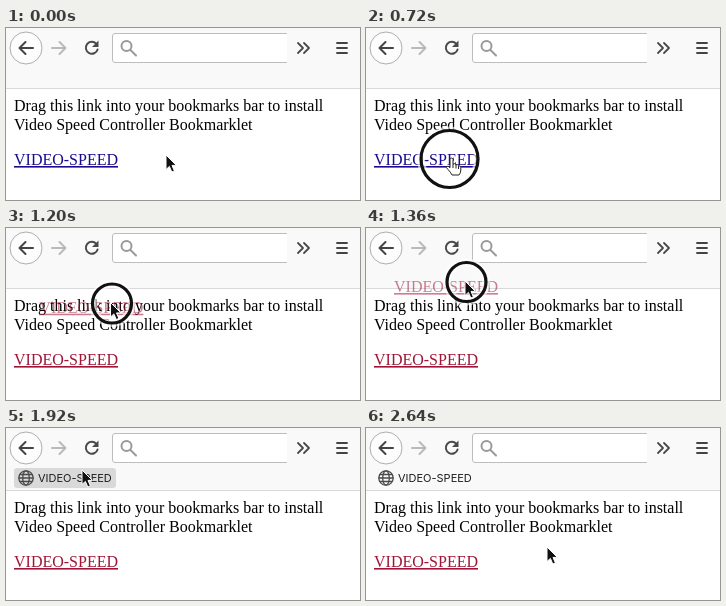
These frames come from a looping animation (354x172 px, 2720 ms). An HTML page:

```html
<!DOCTYPE html>
<html lang="en">
<head>
<meta charset="utf-8">
<title>Install the bookmarklet</title>
<style>
html, body { margin: 0; width: 100%; height: 100%; overflow: hidden; background: #fff; }
svg { display: block; width: 354px; height: 172px; }
text { white-space: pre; }
.page { font: 16px "Liberation Serif", "Times New Roman", serif; }
.bar { font: 11px Inter, Roboto, sans-serif; }
.line { fill: none; stroke-linecap: round; stroke-linejoin: round; }
.link { text-decoration: underline; }
</style>
</head>
<body>
<svg viewBox="0 0 354 172">
  <rect width="354" height="172" fill="#fff"/>
  <rect id="chrome" width="354" height="60" fill="#f9f9fa"/>
  <rect id="rule" y="60" width="354" height="1" fill="#d9d9db"/>

  <circle cx="20" cy="20" r="16" fill="#fdfdfd" stroke="#adadad"/>
  <path class="line" d="M27 20H13.5M19.5 14L13.5 20L19.5 26" stroke="#444" stroke-width="2"/>
  <path class="line" d="M46 20H59.5M53.5 14L59.5 20L53.5 26" stroke="#b9b9b9" stroke-width="2"/>
  <path class="line" d="M90.2 15.6A6 6 0 1 0 91.6 21.5" stroke="#4a4a4a" stroke-width="2"/>
  <path d="M92.5 12.5V19H86Z" fill="#4a4a4a"/>
  <path d="M281 5.5H109Q106.500 5.500 106.500 8V32Q106.500 34.500 109 34.500H281" fill="#fff" stroke="#bdbdbd"/>
  <g class="line" stroke="#999" stroke-width="2">
    <circle cx="120.500" cy="18" r="5"/>
    <path d="M124.500 22L130 27.500"/>
  </g>
  <path class="line" d="M292 15L297 20L292 25M298 15L303 20L298 25" stroke="#4a4a4a" stroke-width="1.8"/>
  <path class="line" d="M331 15H341M331 20H341M331 25H341" stroke="#444" stroke-width="1.8"/>

  <g id="mark">
    <rect id="hover" x="8" y="40" width="102" height="20" rx="3" fill="#d9d9da"/>
    <g class="line" stroke="#4a4a4a" stroke-width="1.300">
      <circle cx="20" cy="50" r="7.200"/>
      <ellipse cx="20" cy="50" rx="3.300" ry="7.200"/>
      <path d="M13 50H27M14 46.500H26M14 53.500H26"/>
    </g>
    <text class="bar" x="32" y="54" fill="#1c1c1c">VIDEO-SPEED</text>
  </g>

  <g id="page" class="page">
    <text x="8" y="83">Drag this link into your bookmarks bar to install</text>
    <text x="8" y="102">Video Speed Controller Bookmarklet</text>
    <text id="link" class="link" x="8" y="137">VIDEO-SPEED</text>
  </g>

  <path id="slot" class="line" d="M0 41Q2.500 47 0 53" stroke="#555" stroke-width="1.500"/>
  <text id="ghost" class="page link" fill="#a01535" opacity=".55">VIDEO-SPEED</text>

  <g id="ring" fill="none">
    <circle stroke="#fff" stroke-opacity=".6" stroke-width="8"/>
    <circle stroke="#111" stroke-width="3.200"/>
  </g>
  <g id="cursor">
    <path id="arrow" d="M0 0V14.500L3.400 11.400L5.800 17L8.400 15.900L6 10.400H10.400Z" fill="#111" stroke="#fff"/>
    <path id="hand" d="M2 1.500Q2 0 3.500 0T5 1.500V6Q7 5 8 6.700Q10 6 10.700 7.700Q12.800 7.500 12.800 9.500V12Q12.800 15 11 17H4Q2.500 14 0 11.500T-1.500 8.500Q0 7.500 2 9.700ZM5 6V10M8 7V10.500M10.500 8V11" fill="#fff" stroke="#222" stroke-linejoin="round"/>
  </g>
</svg>
<script>
const LOOP = 2720, STEP = 80, DROP = 1840;

// Rows: time, values..., the last number is 1 for an eased approach.
const pointer = [
  [80, 160, 127, 0], [560, 82, 130, 1], [800, 82, 130, 0], [1040, 110, 96, 1],
  [1360, 99, 53, 0], [1680, 76, 42, 0], [2240, 76, 42, 0], [2640, 181, 119, 1]
];
const drag = [[1120, 36, 95, 0], [1360, 28, 64, 0], [1680, -2, 49, 0]];
const press = [
  [640, 31, .7, 0], [720, 28.5, 1, 0], [880, 19.5, 1, 1],
  [1760, 19.5, 1, 0], [1920, 29, 0, 0]
];

const el = Object.fromEntries([...document.querySelectorAll("[id]")].map(e => [e.id, e]));
const rings = el.ring.querySelectorAll("circle");

function at(rows, t) {
  const i = rows.findIndex(r => r[0] > t);
  if (i === 0) return rows[0].slice(1, 3);
  if (i < 0) return rows[rows.length - 1].slice(1, 3);
  const a = rows[i - 1], b = rows[i];
  let k = (t - a[0]) / (b[0] - a[0]);
  if (b[3]) k = k * k * (3 - 2 * k);
  return [1, 2].map(n => a[n] + (b[n] - a[n]) * k);
}
const show = (e, on) => e.setAttribute("visibility", on ? "visible" : "hidden");
const move = (e, x, y) => e.setAttribute("transform", `translate(${x} ${y})`);

function draw(t) {
  const [x, y] = at(pointer, t);
  const [r, alpha] = at(press, t);
  const dropped = t >= DROP;
  const shift = dropped ? 2 : 0;
  const onLink = t < 880 && x < 112;

  move(el.page, 0, shift);
  el.chrome.setAttribute("height", 60 + shift);
  el.rule.setAttribute("y", 60 + shift);
  el.link.setAttribute("fill", t >= 800 ? "#a01535" : "#1a0a90");

  show(el.mark, dropped);
  show(el.hover, dropped && x < 110 && y < 60);
  show(el.slot, t >= 1600 && !dropped);
  show(el.ghost, t >= 1120 && !dropped);
  move(el.ghost, ...at(drag, t));

  move(el.cursor, x, y);
  show(el.arrow, !onLink);
  show(el.hand, onLink);
  show(el.ring, t >= 640 && alpha > 0);
  move(el.ring, x + 1.5, y + 1);
  el.ring.setAttribute("opacity", alpha);
  rings.forEach(c => c.setAttribute("r", r));
}

const start = performance.now();
function tick() {
  const t = (performance.now() - start) % LOOP;
  draw(Math.floor(t / STEP) * STEP);
  requestAnimationFrame(tick);
}
tick();
</script>
</body>
</html>
```
